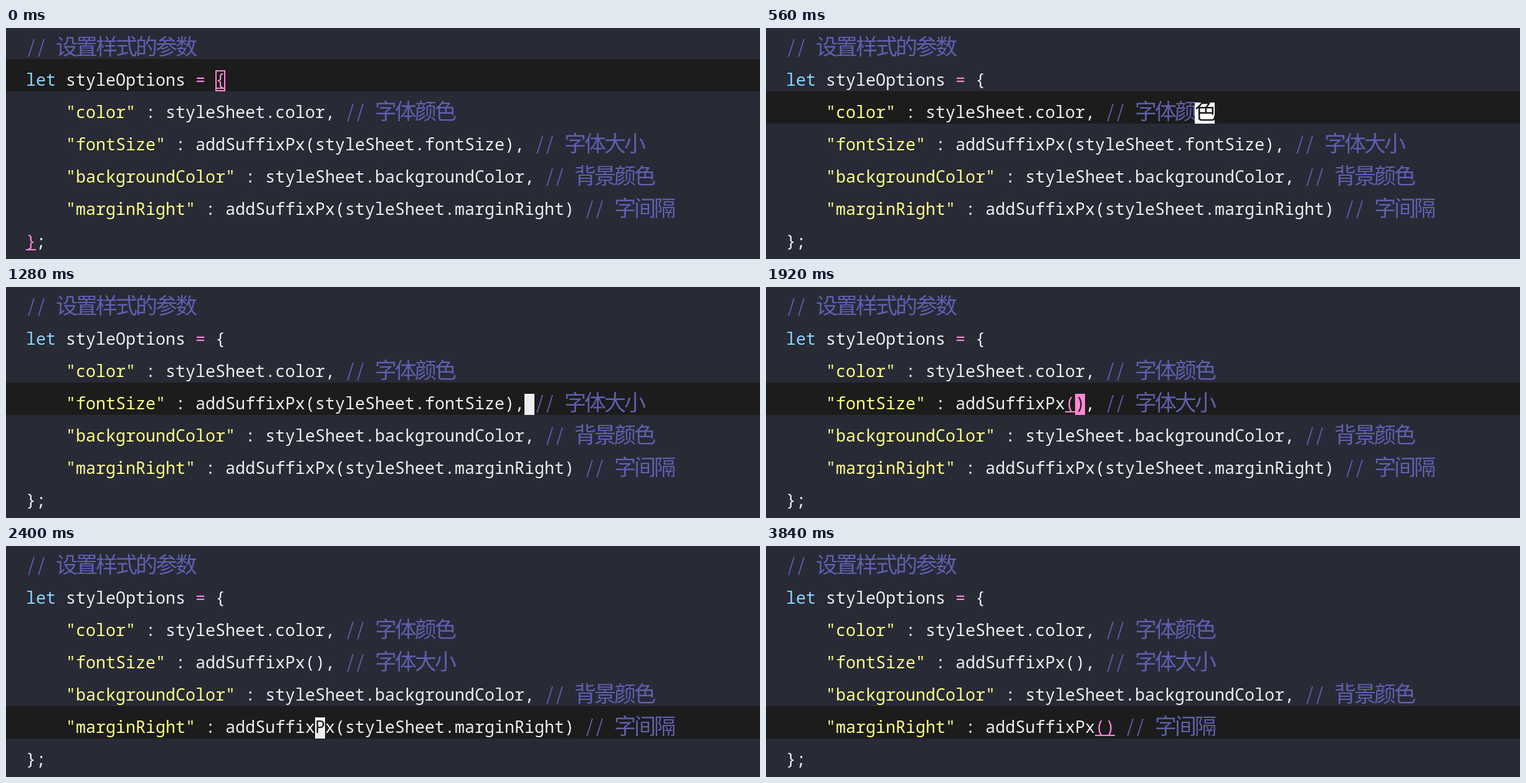
An HTML page with a canvas for the animation above (3920 ms loop, 1210 px wide and 372 px high).

```html
<!DOCTYPE html>
<html lang="zh">
<head>
<meta charset="utf-8">
<style>
  html, body { margin: 0; width: 100%; height: 100%; overflow: hidden; background: #282a36; }
  canvas { display: block; }
</style>
</head>
<body>
<canvas id="stage" width="1210" height="372"></canvas>
<script>
const ctx = document.getElementById('stage').getContext('2d');
const LOOP = 3920, CELL = 16, ROW = 52, LEFT = 32;
const BG = '#282a36', LINE = '#1c1c1c', FG = '#eeeeee', PINK = '#ff87d7',
      YELLOW = '#ffff87', CYAN = '#87d7ff', COMMENT = '#5f5faf';
const MONO = '26.667px "Noto Sans Mono", monospace';
const SLASH = '300 29px "Noto Sans CJK SC", sans-serif';
const HAN = '300 35px "Noto Sans CJK SC", sans-serif';

const source = [
  '// 设置样式的参数',
  'let styleOptions = {',
  '    "color" : styleSheet.color, // 字体颜色',
  '    "fontSize" : addSuffixPx(styleSheet.fontSize), // 字体大小',
  '    "backgroundColor" : styleSheet.backgroundColor, // 背景颜色',
  '    "marginRight" : addSuffixPx(styleSheet.marginRight) // 字间隔',
  '};'
];
// row -> time at which its argument is deleted
const deletions = { 3: 1920, 5: 3520 };

// [time, row, column, cursor look]
const OFF = 0, BLOCK = 1, BOX = 2;
const moves = [
  [0, 1, 19, BOX], [80, 1, 19, BLOCK], [400, 1, 19, OFF],
  [560, 2, 41, BLOCK], [640, 3, 60, BLOCK], [720, 3, 58, BLOCK], [1040, 3, 58, OFF],
  [1200, 3, 53, BLOCK], [1280, 3, 50, BLOCK], [1360, 3, 47, BLOCK], [1440, 3, 46, BLOCK],
  [1760, 3, 46, OFF], [1920, 3, 29, BLOCK], [2240, 3, 29, OFF],
  [2320, 4, 29, BLOCK], [2400, 5, 29, BLOCK], [2560, 5, 30, BLOCK], [2640, 5, 31, BLOCK],
  [2720, 5, 32, BLOCK], [3120, 5, 32, OFF], [3280, 5, 32, BLOCK],
  [3520, 5, 32, BLOCK], [3840, 5, 32, OFF]
];

const rowY = row => row * ROW - 2;
const colX = col => LEFT + col * CELL;
const isHan = ch => ch > '\u2e80';

function fill(color, x, y, w, h) {
  ctx.fillStyle = color;
  ctx.fillRect(x, y, w, h);
}

function tokenColor(token) {
  if (token.startsWith('//')) return COMMENT;
  if (token[0] === '"') return YELLOW;
  return { let: CYAN, '=': PINK }[token] || FG;
}

function matchingBracket(lines, row, col) {
  switch (lines[row][col]) {
    case '{': return [6, 0];
    case '(': return [row, lines[row].indexOf(')')];
    case ')': return [row, lines[row].indexOf('(')];
  }
}

function drawChar(ch, row, col, color) {
  const slash = ch === '/', han = isHan(ch);
  ctx.font = han ? HAN : slash ? SLASH : MONO;
  ctx.fillStyle = color;
  ctx.fillText(ch, colX(col) + (slash ? 3 : 0), rowY(row) + (han ? 45 : 43));
}

function render(time) {
  const [, row, col, look] = moves.findLast(m => m[0] <= time);
  const lines = source.map((s, i) => time >= deletions[i] ? s.replace(/\(.*\)/, '()') : s);
  const pair = matchingBracket(lines, row, col);
  const same = (r, c) => r === row && c === col;

  fill(BG, 0, 0, 1210, 372);
  fill(LINE, 0, rowY(row), 1210, ROW);

  lines.forEach((line, r) => {
    let c = 0;
    for (const token of line.match(/\/\/.*|"[^"]*"|\w+|\s+|./g)) {
      for (const ch of token) {
        const width = isHan(ch) ? 2 : 1;
        const here = same(r, c);
        const bracket = pair && (here || (r === pair[0] && c === pair[1]));
        let color = bracket ? PINK : tokenColor(token);
        if (bracket) fill(PINK, colX(c), rowY(r) + 46, CELL, 2);
        if (here && look === BLOCK) {
          fill(bracket ? PINK : width === 2 ? '#ffffff' : FG,
               colX(c), rowY(r) + 18, width * CELL, 34);
          color = LINE;
        }
        drawChar(ch, r, c, color);
        c += width;
      }
    }
  });

  if (look === BOX) {
    ctx.strokeStyle = PINK;
    ctx.lineWidth = 2;
    ctx.strokeRect(colX(col) + 1, rowY(row) + 19, CELL - 2, 32);
  }
}

const start = performance.now();
function frame() {
  render((performance.now() - start) % LOOP);
  requestAnimationFrame(frame);
}
frame();
</script>
</body>
</html>
```
